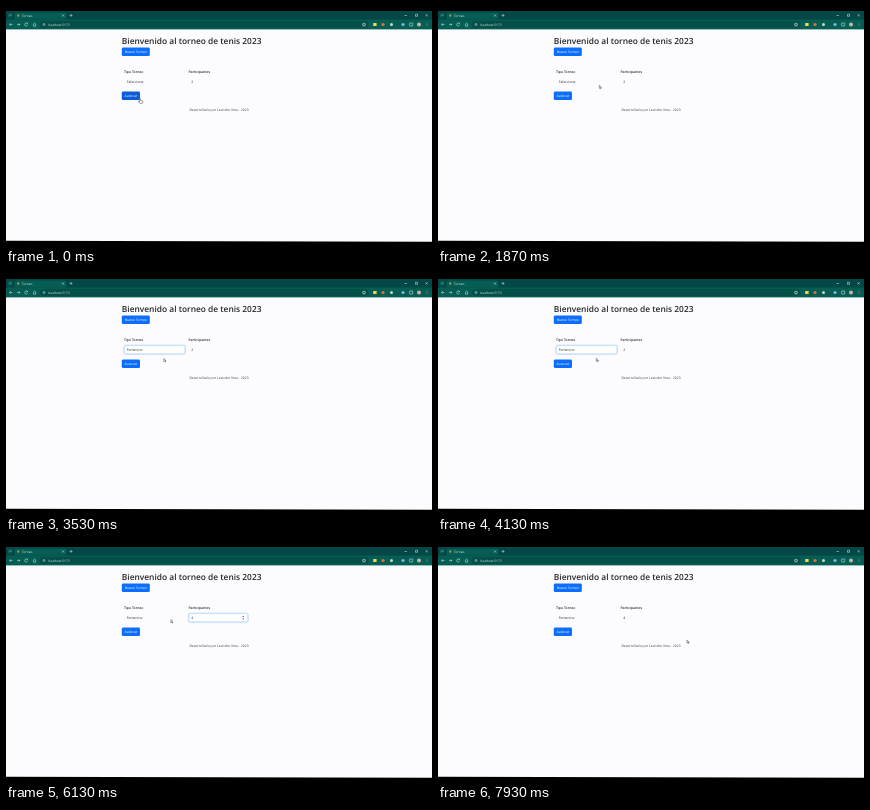
An HTML page for the animation above (8 s loop, 426 px wide and 240 px high).

```html
<!DOCTYPE html>
<html lang="es">
<head>
<meta charset="utf-8">
<title>Torneo</title>
<style>
  html, body { margin: 0; width: 100%; height: 100%; overflow: hidden; background: #000; }
  svg { display: block; width: 100%; height: 100%; }
  text { font: 3.4px "Open Sans", "Noto Sans", sans-serif; fill: #212529; text-rendering: geometricPrecision; }
  .title { font-size: 8.38px; font-weight: 600; }
  .label { font-weight: 600; }
  .button { fill: #0d6efd; }
  .button.hover { fill: #0b5ed7; }
  .caption { fill: #fff; text-anchor: middle; font-weight: 500; }
  .footer { fill: #3c4248; text-anchor: middle; }
  .chrome text { fill: #e6f2ef; font-size: 3.2px; }
  .icons { fill: none; stroke: #e0efeb; stroke-width: .5; }
  .field rect { fill: #fff; stroke: #92bcf5; stroke-width: .45; }
  .field .ring { fill: none; stroke: #d0e2fd; stroke-width: .9; }
  .pointer path { fill: #fff; stroke: #333; stroke-width: .45; stroke-linejoin: round; }
</style>
</head>
<body>
<svg viewBox="0 0 426 240">
  <rect width="426" height="240"/>
  <path d="M0 23h426v212.8L0 234.7z" fill="#fcfcfe"/>

  <g class="chrome">
    <rect y="5" width="426" height="9" fill="#034846"/>
    <rect y="13.5" width="426" height="9.9" fill="#065d53"/>
    <path d="M7 13.6q1.5 0 1.5-1.5V8q0-1.5 1.5-1.5h49q1.5 0 1.5 1.5v4.1q0 1.5 1.5 1.5z" fill="#065d53"/>
    <rect x="34" y="15" width="328" height="7" rx="3.5" fill="#044f48"/>
    <rect x="2" y="7" width="4.5" height="4.5" rx="1.2" fill="#065d53"/>
    <path d="M3.4 8.7l.9.9.9-.9" class="icons"/>
    <circle cx="12.2" cy="9.5" r="1.2" fill="#8d9b4c"/>
    <text x="16" y="10.5">Torneo</text>
    <text x="42" y="19.6">localhost:5173</text>
    <g class="icons">
      <path d="M56 8.5l2 2m0-2l-2 2M63.5 9.4h3M65 7.9v3"/>
      <path d="M6.5 18.5h-3m1.3-1.3l-1.3 1.3 1.3 1.3M11 18.5h3m-1.3-1.3l1.3 1.3-1.3 1.3"/>
      <path d="M21.4 17.7a1.5 1.5 0 1 0 .1 1.4M21.6 16.8v1.1h-1.1M27 18.5l1.6-1.5 1.6 1.5m-2.7-.3v2h2.2v-2"/>
      <circle cx="38" cy="18.5" r="1"/>
      <path d="M358 16.8l.5 1.2 1.3.1-1 .8.3 1.3-1.1-.7-1.1.7.3-1.3-1-.8 1.3-.1z"/>
      <path d="M398.5 9.5h2.4M409.5 8.3h2v2h-2zM419.7 8.4l2 2m0-2l-2 2"/>
      <path d="M403.7 17h3v3h-3zM421 16.8v.6m0 .8v.6m0 .8v.6"/>
    </g>
    <rect x="367.2" y="17" width="3.4" height="3" fill="#f2d64b"/>
    <circle cx="377" cy="18.5" r="1.6" fill="#dd713b"/>
    <circle cx="385.5" cy="18.5" r="1.5" fill="#c8d5d2"/>
    <circle cx="397" cy="18.5" r="1.6" fill="#7fb7d6"/>
    <circle cx="413" cy="18.5" r="2" fill="#c9b5ac"/>
  </g>

  <text class="title" x="115.8" y="38">Bienvenido al torneo de tenis 2023</text>
  <rect class="button" x="115.8" y="41.4" width="28" height="8.6" rx="1.3"/>
  <text class="caption" x="129.8" y="46.9">Nuevo Torneo</text>
  <text class="label" x="118" y="66.5">Tipo Torneo</text>
  <text class="label" x="182.5" y="66.5">Participantes</text>

  <g class="field" id="typeFocus">
    <rect class="ring" x="117.6" y="71" width="62" height="9.4" rx="1.7"/>
    <rect x="118.2" y="71.6" width="60.8" height="8.2" rx="1.3"/>
  </g>
  <text id="type" x="120.8" y="77"></text>
  <g class="field" id="countFocus">
    <rect class="ring" x="182.3" y="71" width="60" height="9.4" rx="1.7"/>
    <rect x="182.9" y="71.6" width="58.8" height="8.2" rx="1.3"/>
    <path d="M236.2 75l1-1.2 1 1.2zM236.2 76.5l1 1.2 1-1.2z" fill="#555"/>
  </g>
  <rect id="selection" x="185.1" y="73.3" width="2.4" height="4.8" fill="#1a73d9"/>
  <text id="count" x="185.3" y="77"></text>

  <rect class="button" id="next" x="115.8" y="85.4" width="18.2" height="8.6" rx="1.3"/>
  <text class="caption" x="124.9" y="90.9">Avanzar</text>
  <path d="M0 97.2h426" stroke="#f3f4f6" stroke-width=".4"/>
  <text class="footer" x="213" y="105">Desarrollado por Leandro Vera - 2023</text>

  <g class="pointer" id="pointer">
    <path id="arrow" d="M0 0v3.1l.8-.7.5 1.1.6-.3-.5-1h.9z"/>
    <path id="hand" d="M-.4 0q.4-.4.8 0v1.7l2 .5q.5.2.4.7l-.4 1.8H-.3L-1.7 2.8q.1-.6.6-.3l.7.6z"/>
    <path id="beam" d="M-.7-1.8H.7M0-1.8v3.6M-.7 1.8H.7"/>
  </g>
</svg>
<script>
const LOOP = 8000, FPS = 15;
// Pointer stops: time, x, y
const stops = [
  [0, 134, 92.6], [700, 134, 92.6], [1500, 161.3, 79.3], [1950, 161.3, 79.3],
  [2250, 154, 76], [2500, 154, 76], [2850, 154.3, 87], [3300, 154.3, 87],
  [3600, 158.3, 84.2], [4250, 158.3, 84.2], [4750, 188, 76], [4950, 188, 76],
  [5250, 171, 75.2], [5950, 171, 75.2], [6700, 130, 91.6], [7250, 130, 91.6],
  [7800, 249, 98], [LOOP, 249, 98]
];
const $ = id => document.getElementById(id);
const show = (id, on) => $(id).style.display = on ? "" : "none";
const ease = p => p * p * (3 - 2 * p);

function pointerAt(t) {
  const i = Math.max(1, stops.findIndex(s => s[0] >= t));
  const [t0, x0, y0] = stops[i - 1], [t1, x1, y1] = stops[i];
  const p = ease((t - t0) / (t1 - t0));
  return [x0 + (x1 - x0) * p, y0 + (y1 - y0) * p];
}

function draw(now) {
  const t = Math.floor((now % LOOP + 5) * FPS / 1000) * 1000 / FPS;
  const [x, y] = pointerAt(t);
  const overButton = x >= 115.8 && x <= 134.1 && y >= 85.4 && y <= 94;
  const overCount = x >= 183 && x <= 242 && y >= 71.5 && y <= 80;
  const selected = t >= 5100 && t < 5800;

  show("typeFocus", t >= 2350 && t < 4850);
  show("countFocus", t >= 4850 && t < 7100);
  show("selection", selected);
  $("type").textContent = t < 3500 ? "Seleccione" : "Femenino";
  $("count").textContent = t < 5800 ? "2" : "4";
  $("count").style.fill = selected ? "#fff" : "";
  $("next").classList.toggle("hover", overButton);

  $("pointer").setAttribute("transform", `translate(${x} ${y})`);
  show("hand", overButton);
  show("beam", overCount);
  show("arrow", !overButton && !overCount);
  requestAnimationFrame(draw);
}
draw(0);
</script>
</body>
</html>
```
